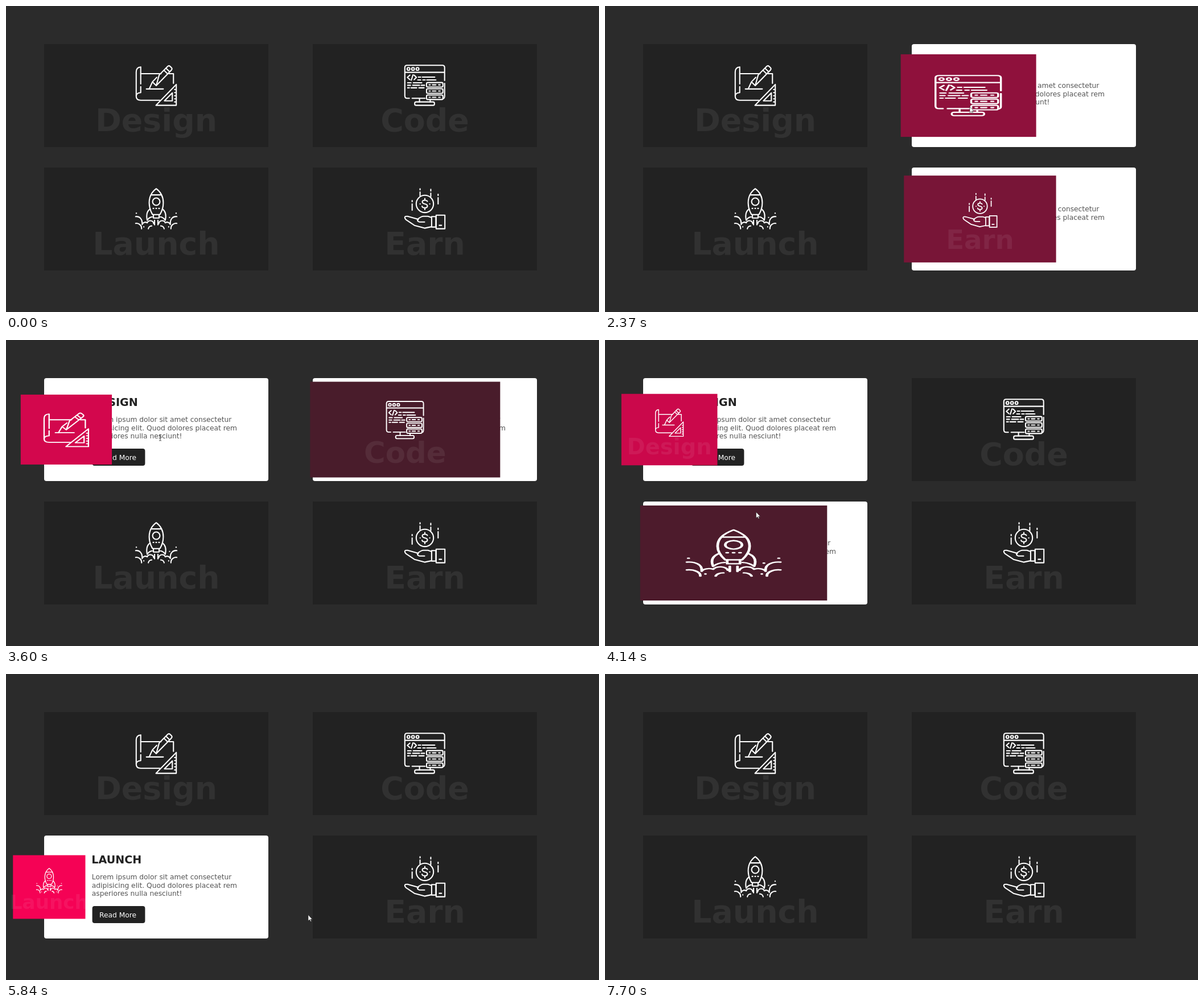
Write an HTML page that moves like this. It is 1042x538 px and loops after 8000 ms.

```html
<!DOCTYPE html>
<html lang="en">
<head>
<meta charset="utf-8">
<title>Hover cards</title>
<style>
  html, body { margin: 0; width: 100%; height: 100%; overflow: hidden; background: #2b2b2b; }
  svg { display: block; width: 100vw; height: 100vh; }
  text { font-family: "DejaVu Sans", Verdana, sans-serif; font-size: 12.28px; }
  .title { font-size: 19.1px; font-weight: bold; fill: #222; }
  .para { fill: #555; }
  .more { fill: #fff; }
  .label { font-size: 55.3px; font-weight: bold; fill: #fff; fill-opacity: .07; text-anchor: middle; }
  .icon { fill: none; stroke: #fff; stroke-width: 2.1; stroke-linecap: round; stroke-linejoin: round; }
</style>
</head>
<body>
<svg id="stage" viewBox="0 0 1042 538" preserveAspectRatio="none"></svg>
<script>
const LOOP = 8000, FADE = 840;
const W = 394, H = 181;
const DARK = [34, 34, 34], PINK = [255, 0, 87];

const path = d => `<path d="${d}"/>`;
const circle = (x, y, r) => `<circle cx="${x}" cy="${y}" r="${r}"/>`;
const rect = (x, y, w, h, r = 0) => `<rect x="${x}" y="${y}" width="${w}" height="${h}" rx="${r}"/>`;

// Icons live in a 73 x 73 box.
const server = y => rect(39.5, y, 29, 8, 2) + path(`M44 ${y + 4}h2M50 ${y + 4}h6M61 ${y + 4}h2.5`);

const fin = path('M25.5 37C20 41 18.5 48 20.5 57Q24 51.5 29.5 51');
const cloud = path('M0 50.5C7 49.5 12 55 11.5 63M0 62.5A9 9 0 0 1 10.5 72' +
  'M11.5 64.5A6 6 0 0 1 20.5 61.5A6 6 0 0 1 32 63M22.5 72A6 6 0 0 1 28.5 67M1 44.5h.5M14.5 68.5v.3');
const half = fin + cloud;

const icons = {
  Design:
    path('M9 4Q1 4.500 1 13V56Q1 63 9 63H43M9 4V34M9 39V49.500Q1 50 1 56') +
    path('M9 16H45M59 16H67V33M19 43H49') +
    `<g transform="translate(24 43) rotate(-45.500)">${
      path('M0 0L13-4.700H24M30-4.700H51Q54.500-4.700 54.500-1.500V1.500Q54.500 4.700 51 4.700H13ZM42-4.700V4.700M47-4.700V4.700M13-4.700V4.700')}</g>` +
    path('M72 35V72H36ZM65 50V64H51ZM69 44h3M69 49.500h3M69 55h3M69 60.500h3M69 66h3'),
  Code:
    path('M71.5 28V5Q71.5 1 67.500 1H5Q1 1 1 5V55Q1 59.500 5 59.500H9M14 59.500H37M71.500 33V56Q71.500 59 69.500 60M1 13.500H71') +
    [7.5, 15.5, 23.5].map(x => circle(x, 7.5, 2.4)).join('') +
    path('M10 18.500L5.500 22.500 10 26.500M15.500 18L12.500 27.500M17.500 18.500L21.500 22.500 17.500 26.500') +
    path('M25 22h4M32 22h22M24 27h5M33 27h4M40 27h16M6 32h6M16 32h15M6 36.500h5M15 36.500h12M30 36.500h6M6 41h3M12 41h10M26 41h9') +
    server(31.7) + server(42.7) + server(53.7) +
    path('M27 60V66M46 62.500V66') + rect(18.5, 66, 35, 6, 2.5),
  Launch:
    path('M36.5 1C27 8 24 16 24 26C24 35 27 42 30 47H43C46 42 49 35 49 26C49 16 46 8 36.5 1ZM28 12H45') +
    circle(36.5, 24, 6.5) +
    path('M31 36h1M36 36h1M41 36h1M31.500 47V53H41.500V47M33.500 57V65M39.500 57V65') +
    half + `<g transform="translate(73 0) scale(-1 1)">${half}</g>` + path('M60 52h.3'),
  Earn:
    circle(36.5, 28, 15.3) +
    path('M41 23.500Q40 21.500 36.500 21.500C30.500 21.500 30.500 27 36.500 28C42.500 29 42.500 35 36.500 35Q32 35 31.500 32M36.500 18.500V21M36.500 35V38M28 28h.3M45 28h.3') +
    path('M28 1v2M28 7v7M47 2v3M47 9v6M60 11v2M60 17v11M14 22v2M14 28v11') +
    path('M24 55L6 50Q1 49.500 1 52Q1 55 6 58L18 66 36 71 48 68.500M23 55.500Q30 50 34 50H42L48 52M36 60H27Q21 58 25 55.500') +
    rect(48.5, 50.5, 7.5, 18.5) + rect(56.5, 48, 15.5, 24) + path('M62 66h4')
};

// Each "over" pair gives when the pointer enters and leaves.
const cards = [
  { name: 'Design', x: 67, y: 67, over: [[3180, 3995]] },
  { name: 'Code', x: 539, y: 67, over: [[2126, 3161]] },
  { name: 'Launch', x: 67, y: 284, over: [[4011, 5788]] },
  { name: 'Earn', x: 539, y: 284, over: [[841, 2074], [5848, 6845]], press: [6150, 6575] }
];

// Pointer way: time, x, y.
const way = [
  [410, 622, 528], [841, 636, 466], [1190, 640, 425], [1700, 642, 380], [2000, 642, 310], [2074, 642, 284],
  [2126, 642, 248], [2370, 641, 177], [2900, 641, 170], [3060, 600, 168], [3161, 539, 169], [3180, 460, 170],
  [3600, 271, 172], [3850, 268, 205], [3995, 266, 248], [4011, 266, 284], [4520, 264, 357], [4700, 264, 390],
  [5200, 264, 438], [5460, 264, 438], [5788, 460, 427], [5840, 531, 423.5], [5870, 555, 423], [6150, 628, 422],
  [6400, 680, 424], [6575, 704, 438], [6850, 755, 466], [6940, 810, 492], [7060, 872, 518]
];

const lines = ['Lorem ipsum dolor sit amet consectetur', 'adipisicing elit. Quod dolores placeat rem', 'asperiores nulla nesciunt!'];

const stage = document.getElementById('stage');
stage.innerHTML = `<rect width="1042" height="538" fill="#2b2b2b"/>` + cards.map(c => `
  <g transform="translate(${c.x} ${c.y})">
    <rect width="${W}" height="${H}" rx="4" fill="#fff"/>
    <text class="title" x="83.300" y="49.300">${c.name.toUpperCase()}</text>
    ${lines.map((s, i) => `<text class="para" x="83.800" y="${77 + i * 14.7}">${s}</text>`).join('')}
    <rect class="button" x="84.600" y="123.900" width="92.800" height="30" rx="4"/>
    <text class="more" x="97" y="143.900">Read More</text>
    <g class="face">
      <rect class="back" y="${-H / 2}" height="${H}"/>
      <text class="label" y="62.800">${c.name}</text>
      <g class="icon">${icons[c.name]}</g>
    </g>
  </g>`).join('') + `
  <g id="pointer" stroke-linejoin="round">
    <path class="arrow" d="M0 0V10.500L2.500 8.300 4.200 11.800 5.700 11.100 4.100 7.700H7.300Z" fill="#fff" stroke="#222" stroke-width=".6"/>
    <path class="beam" d="M-2-5H-.5L0-4.500 .5-5H2M0-4.500V4.500M-2 5H-.5L0 4.500 .5 5H2" fill="none" stroke="#333" stroke-width=".9"/>
    <path class="hand" d="M-1 0Q0-1 1 0V4L5 5Q6 5.500 6 7L5 11H-1L-4 7Q-4 5-2 6L-1 7Z" fill="#fff" stroke="#222" stroke-width=".6"/>
  </g>`;

const faces = stage.querySelectorAll('.face');
const buttons = stage.querySelectorAll('.button');
const pointer = document.getElementById('pointer');
const shapes = [...pointer.children];

// The CSS "ease" curve.
function ease(x) {
  if (x <= 0) return 0;
  if (x >= 1) return 1;
  let lo = 0, hi = 1;
  for (let i = 0; i < 24; i++) {
    const s = (lo + hi) / 2;
    if (.75 * s * (1 - s) + s ** 3 < x) lo = s; else hi = s;
  }
  return .3 * lo * (1 - lo) ** 2 + 3 * lo * lo * (1 - lo) + lo ** 3;
}

// Progress of a hover transition; an early leave runs back in shorter time.
function hover(t, [enter, leave]) {
  if (t < leave) return ease((t - enter) / FADE);
  const peak = ease((leave - enter) / FADE);
  return peak * (1 - ease((t - leave) / (FADE * peak)));
}

const mix = p => `rgb(${DARK.map((v, i) => Math.round(v + (PINK[i] - v) * p))})`;

function drawCard(c, i, t) {
  const p = Math.max(...c.over.map(o => hover(t, o)));
  const open = c.over.some(([a, b]) => t >= a && t < b);
  const scale = 1 - .4 * p, w = W * (1 - .5 * p), cx = W / 2 * (1 - p);
  const [back, label, icon] = faces[i].children;
  faces[i].setAttribute('transform', `translate(${cx} ${H / 2}) scale(${scale})`);
  back.setAttribute('x', -w / 2);
  back.setAttribute('width', w);
  back.setAttribute('fill', mix(p));
  label.setAttribute('visibility', open ? 'hidden' : 'visible');
  const size = open ? [w / 146, H / 146] : [H * .4 / 73, H * .4 / 73];
  icon.setAttribute('transform', `translate(0 ${open ? 0 : -H * .1}) scale(${size}) translate(-36.5 -36.5)`);
  buttons[i].setAttribute('fill', mix(c.press ? hover(t, c.press) : 0));
  c.edge = cx + w * scale / 2;
}

function pointerShape(x, y) {
  for (const c of cards) {
    const lx = x - c.x, ly = y - c.y;
    if (lx < Math.max(84, c.edge) || lx > W) continue;
    if (ly > 66 && ly < 111 && lx < 340) return 1;
    if (ly > 123.5 && ly < 154 && lx < 178) return 2;
  }
  return 0;
}

function drawPointer(t) {
  const n = way.findIndex(k => k[0] > t);
  pointer.setAttribute('visibility', n > 0 ? 'visible' : 'hidden');
  if (n < 1) return;
  const [t0, x0, y0] = way[n - 1], [t1, x1, y1] = way[n];
  const k = (t - t0) / (t1 - t0), x = x0 + (x1 - x0) * k, y = y0 + (y1 - y0) * k;
  pointer.setAttribute('transform', `translate(${x} ${y})`);
  const shown = pointerShape(x, y);
  shapes.forEach((s, i) => s.setAttribute('display', i === shown ? 'inline' : 'none'));
}

function draw(t) {
  cards.forEach((c, i) => drawCard(c, i, t));
  drawPointer(t);
}

let start;
function tick(now) {
  start ??= now;
  draw((now - start) % LOOP);
  requestAnimationFrame(tick);
}
draw(0);
requestAnimationFrame(tick);
</script>
</body>
</html>
```
